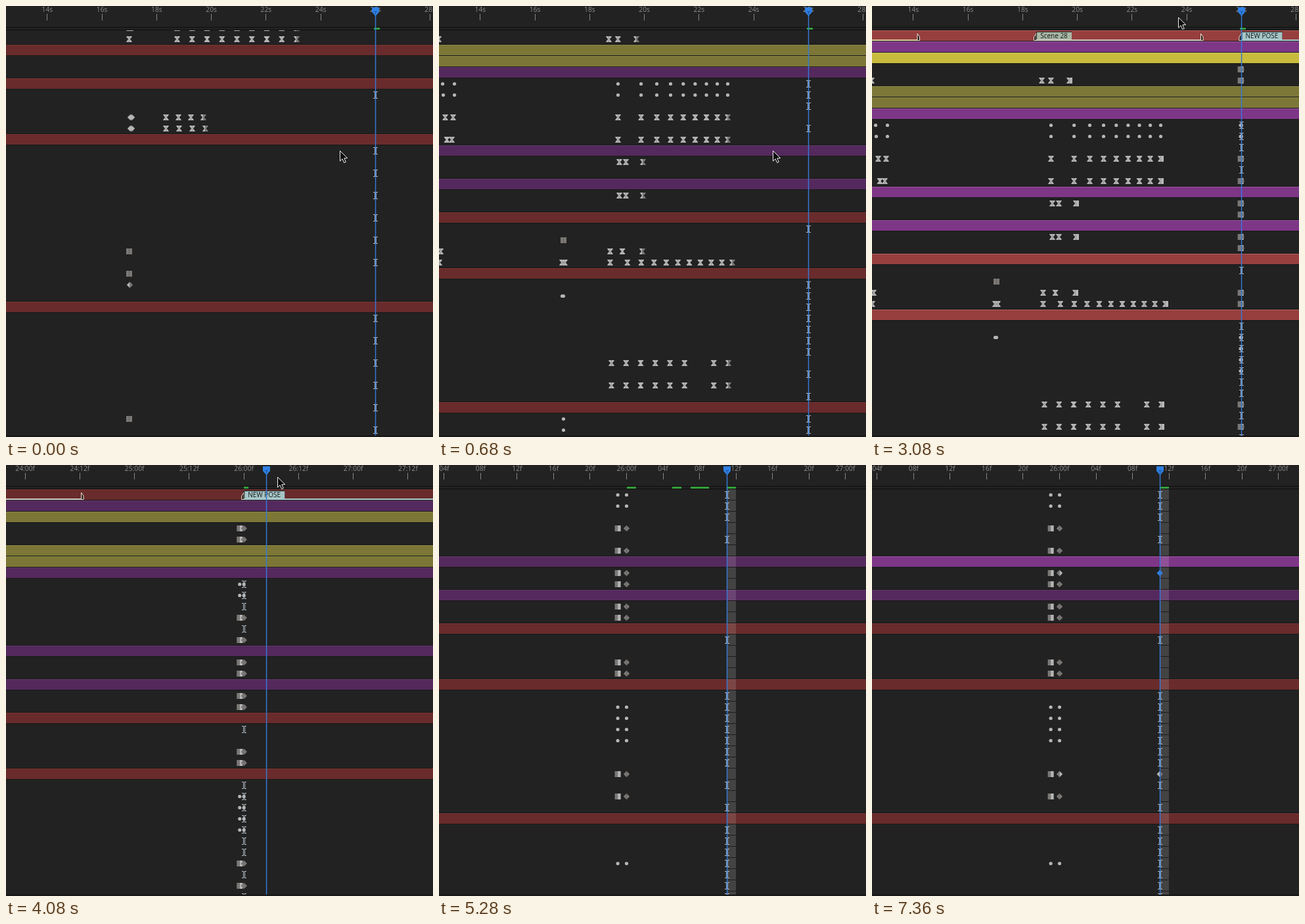
An HTML page with a canvas for the animation above (7.4 s loop, 650x656 px).

```html
<!DOCTYPE html>
<html lang="en">
<head>
<meta charset="utf-8">
<title>Keyframe timeline</title>
<style>
html, body { margin: 0; width: 100%; height: 100%; overflow: hidden; background: #222; }
canvas { display: block; width: 650px; height: 656px; }
</style>
</head>
<body>
<canvas id="stage" width="650" height="656"></canvas>
<script>
const ctx = document.getElementById('stage').getContext('2d');
const LOOP = 7400, STEP = 40, W = 650, TOP = 37, BOTTOM = 654, ROW = 17, ROWS = 94;
const PPS = 41.63, POSE = 562.4;         // base scale, base x of 26 s
const LIGHT = '#b6b6b6', GRAY = '#7b7876', BLUE = '#2f80e4', DARK = '#0e0e0e';

// [body, top edge] dimmed, then selected
const PAINT = {
  red: [['#692b2b', '#7a3735'], ['#963f3e', '#b3625f']],
  purple: [['#54295d', '#653a6d'], ['#7e3687', '#9b57a3']],
  yellow: [['#7c7736', '#8b8748'], ['#c8bb3d', '#d7cd64']]
};
const LOCKED = [5, 6];
const isBar = r => [0, 1, 2, 5, 6, 7, 14, 17, 20, 25, 37, 48, 59, 62, 67, 82].includes(r);
const hue = r => r === 2 || LOCKED.includes(r) ? 'yellow' : r > 0 && r < 20 ? 'purple' : 'red';

const between = (r, a, b) => r >= a && r <= b;
const hasBeam = r => between(r, 8, 10) || r === 12 || r === 21 || between(r, 26, 32) || r === 34 || r === 36 ||
  between(r, 38, 44) || between(r, 49, 55) || r === 63 ||
  between(r, 68, 78) && r % 2 === 0 || r > 82 && r % 2 === 1;

// n keys from a to b; p bends the spacing
const beats = (a, b, n, p = 1) => Array.from({ length: n }, (_, i) => a + (b - a) * (i / (n - 1)) ** p);
const gait = beats(272, 439, 9, .75), nod = beats(274, 310, 3, 1.85);
const reach = beats(262, 440, 9).filter((_, i) => i !== 6);
const stride = beats(260, 442, 9), sway = beats(251, 373, 5, 1.15), contact = [187, 189];
const EASE = {
  4: [-1, ...beats(258, 300, 3, 1.6)],
  11: [9, 21, ...gait], 13: [11.5, 19, ...gait],
  15: nod, 18: nod,
  23: [2, ...beats(260, 309, 3, 1.4)],
  24: [0, 187, 191, ...beats(260, 446, 11, .85)],
  33: reach, 35: reach,
  46: [...contact, ...sway], 47: [...contact, ...sway],
  57: [...contact, ...stride], 58: [187, ...stride],
  65: beats(243, 300, 4), 66: beats(243, 303, 4)
};
const DOTS = { 8: [5, 23, ...gait], 9: [6, 23, ...gait], 27: contact, 42: [289, 361], 43: [189, 289, 361] };
for (const r of [38, 39, 50, 51]) DOTS[r] = [189];
for (const r of [53, 54]) DOTS[r] = [297];
const HOLDS = { 22: 189, 45: 361, 56: 189, 77: 187, 79: 187, 92: 187 };
const POSE_KEYS = [3, 4, 11, 13, 15, 16, 18, 19, 23, 24, 33, 35];
const POSE_DOTS = [8, 9, 27, 28, 29, 30, 41];

const SCROLL = [[0, 981], [400, 556], [680, 63], [760, 0]];
const POINTER = [[1080, 508, 220], [1480, 495, 42], [1760, 477, 17], [3000, 477, 17],
  [3640, 390, 18], [4080, 413, 18], [4400, 440, 18], [4760, 440, 18], [5240, 176, 381]];
const VISITED = [0, 5, 7, 8, 11];        // playhead stops, in frames after 26 s
const ZOOM_AT = [3320, 3480, 4600], ZOOM_X = [POSE, 462, 362.2, 285.5];

const clamp = (v, a, b) => Math.min(b, Math.max(a, v));
const smooth = u => { u = clamp(u, 0, 1); return u * u * (3 - 2 * u); };
function tween(tab, t) {
  const i = clamp(tab.findIndex(k => k[0] > t), -1, tab.length);
  if (i < 0) return tab[tab.length - 1].slice(1);
  if (i === 0) return tab[0].slice(1);
  const a = tab[i - 1], b = tab[i], u = (t - a[0]) / (b[0] - a[0]);
  return a.slice(1).map((v, j) => v + (b[j + 1] - v) * u);
}

function rect(x, y, w, h, c) { ctx.fillStyle = c; ctx.fillRect(x, y, w, h); }
function poly(pts, c, edge) {
  ctx.beginPath();
  pts.forEach(([x, y]) => ctx.lineTo(x, y));
  ctx.closePath();
  ctx.fillStyle = c; ctx.fill();
  if (edge) { ctx.strokeStyle = edge; ctx.lineWidth = 1; ctx.stroke(); }
}
function text(s, x, y, c, size) {
  ctx.font = size + 'px "Open Sans", "Noto Sans", sans-serif';
  ctx.textAlign = 'center'; ctx.fillStyle = c;
  ctx.fillText(s, x, y);
}
function dot(x, y) {
  ctx.beginPath(); ctx.arc(x + .5, y + .5, 2.6, 0, 7);
  ctx.fillStyle = LIGHT; ctx.fill();
}
const SHAPES = {
  ease: [[0, -4.5], [4.2, -4.5], [4.2, -3.5], [1.3, 0], [4.2, 3.5], [4.2, 4.5], [0, 4.5]],
  line: [[0, -4.7], [4.7, 0], [0, 4.7]],
  hold: [[0, -4.5], [4.5, -4.5], [4.5, 4.5], [0, 4.5]]
};
const half = (x, y, side, kind, c) =>
  poly(SHAPES[kind].map(([a, b]) => [x + .5 + side * a, y + .5 + b]), c);
function key(x, y, kind, left, right = left, rightKind = kind) {
  half(x, y, -1, kind, left);
  half(x, y, 1, rightKind, right);
}
function ibeam(x, y) {
  for (const s of [-1, 1]) {
    rect(x + s, y - 5, 1, 11, '#aeb9c2');
    for (const d of [-5, 5]) rect(s < 0 ? x - 3 : x + 1, y + d, 3, 1, '#aeb9c2');
  }
}
function bracket(x, side, y) {
  poly([[x, y - 3], [x + side * 3.5, y + 2], [x + side * 3.5, y + 7.5], [x, y + 7.5]], '#2a2020', '#ece4d2');
}
function marker(name, x, y, w, tint, line, end) {
  rect(x, y + 6, end - x, 2, line);
  bracket(x, -1, y);
  rect(x, y - 6, w, 12, '#20282a');
  rect(x + 1, y - 5, w - 1, 11, tint);
  text(name, x + w / 2, y + 3.5, '#15191a', 10);
}

function ruler(pps, x26) {
  rect(0, 0, W, TOP, '#222');
  for (const y of [32, 36]) rect(0, y, W, 1, DARK);
  const step = pps < 60 ? 48 : pps < 120 ? 24 : pps < 250 ? 12 : 4;
  const pad = n => String(n).padStart(2, '0');
  for (let f = Math.floor((-40 - x26) / pps * 24 / step) * step; ; f += step) {
    const x = x26 + f * pps / 24;
    if (x > W + 30) break;
    const sec = 26 + Math.floor(f / 24), fr = (f % 24 + 24) % 24;
    const name = step > 12 ? sec + 's' : (step === 12 || !fr ? sec + ':' : '') + pad(fr) + 'f';
    text(name, x, 8.5, '#8d8d8d', 10.3);
    rect(Math.round(x - .5), 12, 1, 10, '#858585');
  }
}

function playhead(x) {
  const p = Math.floor(x);
  rect(p - .2, 14, 1.5, BOTTOM - 14, '#3578d4');
  poly([[p - 5, 2], [p + 6, 2], [p + 6, 9], [p + .5, 15.5], [p - 5, 9]], BLUE);
  rect(p - 2, 8, 5, 1, '#1b549f');
  rect(p, 8, 1, 5, '#1b549f');
}

function arrow(x, y) {
  const pts = [[0, 0], [0, 15.5], [3.6, 12.2], [6.2, 18], [8.8, 16.9], [6.3, 11.3], [11.2, 11]];
  poly(pts.map(([a, b]) => [x + .5 + a, y + .5 + b]), '#0b0b0b', '#f0f0f0');
}

function draw(t) {
  const level = ZOOM_AT.filter(at => t >= at).length;
  const zoom = 2 ** level, x26 = ZOOM_X[level], pps = PPS * zoom, fw = pps / 24;
  const px = x => x26 + (x - POSE) * zoom;
  const scroll = Math.round(t < 1000 ? tween(SCROLL, t)[0] : 136 * smooth((t - 4760) / 320));
  const yOf = r => 45 + ROW * r - scroll;
  const now = VISITED[clamp(Math.floor((t - 3900) / 100), 0, VISITED.length - 1)];
  const headX = x26 + now * fw, settled = t >= 4480;
  const posed = r => t >= (r < 5 ? 1520 : 1840 + (r - 8) * 20);
  const allOn = t >= 1200 && t < 3160;
  const armKey = t >= 5680, legKey = t >= 6400;
  const armOn = t >= 5600 && t < 6080, legOn = t >= 6080;
  const lit = r => allOn && !LOCKED.includes(r) || armOn && r === 25 || legOn && r === 14;

  rect(0, 0, W, 656, '#222');
  ctx.save();
  ctx.beginPath(); ctx.rect(0, TOP, W, BOTTOM - TOP); ctx.clip();

  for (let r = 0; r < ROWS; r++) {
    const y = yOf(r), top = y - 8;
    if (y < TOP - 10 || y > BOTTOM + 10) continue;

    if (isBar(r)) {
      const [body, edge] = PAINT[hue(r)][+lit(r)];
      rect(0, top - 1, W, ROW + 1, '#181818');
      rect(0, top, W, 16, body);
      rect(0, top, W, 1, edge);
    }
    // current-frame column, once a frame is wide enough
    if (fw > 10) {
      rect(Math.round(headX), top, Math.round(fw), 16, isBar(r) ? 'rgba(255,255,255,.13)' : '#434343');
      rect(Math.round(headX), top + 16, Math.round(fw), 1, '#1c1c1c');
    }
    if (r === 0) {
      rect(0, y + 6, px(69), 2, '#d9cf9a');
      bracket(px(69), 1, y);
      marker('Scene 28', px(250), y, 54, '#a9b7a4', '#d4cdc6', px(500.5));
      bracket(px(500.5), 1, y);
      if (t >= 3000) marker('NEW POSE', x26, y, 62, '#a5c4c5', '#a9cdd0', W);
    }

    if (hasBeam(r)) ibeam(Math.floor(settled ? headX : x26), y);
    (DOTS[r] || []).forEach(x => dot(px(x), y));
    const keyed = POSE_KEYS.includes(r) && posed(r);
    (EASE[r] || []).forEach((x, i, all) => {
      const last = i === all.length - 1;
      key(px(x), y, 'ease', LIGHT, last && !keyed ? GRAY : LIGHT, last && keyed ? 'hold' : 'ease');
    });
    if (HOLDS[r]) key(px(HOLDS[r]), y, 'hold', GRAY);
    if (r === 45) for (const x of [187, 290]) key(px(x), y, 'hold', GRAY, LIGHT);
    if (r === 65 || r === 66) for (const x of [189, 191]) key(px(x), y, 'line', LIGHT);
    if (r === 80) key(px(188), y, 'line', LIGHT, GRAY);

    if (keyed) {
      const next = r === 15 && legKey || r === 33 && armKey;
      key(x26 - fw, y, 'hold', GRAY, LIGHT);
      key(x26 - .5, y, 'line', GRAY, next ? LIGHT : GRAY);
    }
    if (POSE_DOTS.includes(r) && posed(r)) for (const x of [x26 - fw, x26 - .5]) dot(x, y);
    if (r === 33 && armKey) key(headX - .5, y, 'line', armOn ? BLUE : LIGHT, armOn ? BLUE : GRAY);
    if (r === 15 && legKey) key(headX - .5, y, 'line', BLUE);
  }
  ctx.restore();

  rect(0, BOTTOM, W, 1, DARK);
  ruler(pps, x26);

  // cached frames
  const cached = f => t >= 5600 ? f === 11 : !f || f < now || settled;
  for (const f of VISITED) if (cached(f) && (f === 0 || level > 1)) {
    rect(Math.round(x26 + f * fw) - (level ? 0 : 2), 33, level ? Math.round(fw) : 9, 3, '#35a03a');
  }

  playhead(headX);
  if (t < 5280) arrow(...tween(POINTER, t).map(Math.round));
}

function tick() {
  draw(Math.floor(performance.now() % LOOP / STEP) * STEP);
  requestAnimationFrame(tick);
}
tick();
</script>
</body>
</html>
```
